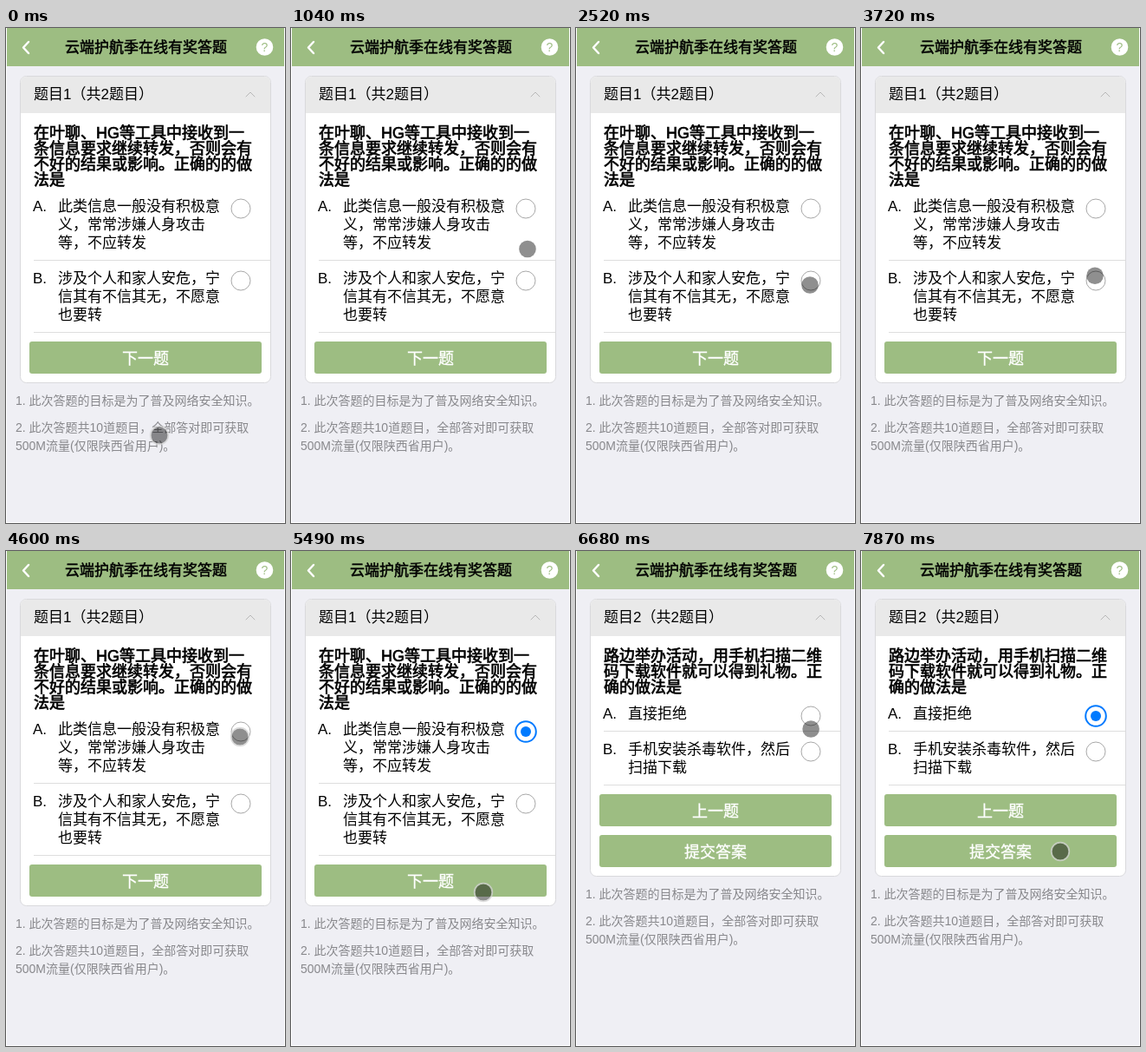
Animation, 322 px wide and 570 px high, one loop 8000 ms. Source, as an HTML page:

```html
<!DOCTYPE html>
<html lang="zh-CN">
<head>
<meta charset="utf-8">
<style>
  html, body { margin: 0; width: 100%; height: 100%; overflow: hidden; background: #fff; }
  svg { display: block; width: 322px; height: 570px;
        font: 17px "Liberation Sans", "Noto Sans CJK SC", "Noto Sans CJK", sans-serif; }
  .title { stroke: #000; stroke-width: .5px; }
  .question { font-size: 18px; stroke: #000; stroke-width: .7px; }
  .button { font-size: 18px; fill: #fff; stroke: #fff; stroke-width: .3px; text-anchor: middle; }
  .note { font-size: 14px; fill: #88888c; }
  .line { fill: none; stroke-linecap: round; stroke-linejoin: round; }
</style>
</head>
<body>
<svg id="stage" viewBox="0 0 322 570"></svg>
<script>
const LOOP = 8000, TICK = LOOP / 54;
const GREEN = '#9dbd82', BLUE = '#007aff';
const stage = document.getElementById('stage');

const text = (x, y, str, cls = '') => `<text x="${x}" y="${y}" class="${cls}">${str}</text>`;
const rect = (x, y, w, h, fill, extra = '') =>
  `<rect x="${x}" y="${y}" width="${w}" height="${h}" fill="${fill}" ${extra}/>`;
const circle = (x, y, r, attrs) => `<circle cx="${x}" cy="${y}" r="${r}" ${attrs}/>`;

const emptyRadio = y => circle(271, y, 11, 'fill="#fff" stroke="#a8a8a8"');
const checkedRadio = y =>
  circle(271, y, 11.8, `fill="#fff" stroke="${BLUE}" stroke-width="2"`) +
  circle(271, y, 6, `fill="${BLUE}"`);

function buildPage(number, question, options, buttons) {
  let y = 127, body = '', checked = '';
  for (const row of question) {
    body += text(32, y, row, 'question');
    y += 18;
  }
  y += 12;
  options.forEach((rows, i) => {
    body += text(31, y, 'AB'[i] + '.');
    rows.forEach((row, k) => body += text(60, y + 21 * k, row));
    body += emptyRadio(y - 3);
    if (i === 0) checked = checkedRadio(y - 3);
    y += 21 * rows.length;
    body += rect(32, y - 7, 273, 1, '#dedede');
    y += 20;
  });
  y -= 16;
  for (const label of buttons) {
    body += rect(27, y, 268, 37, GREEN, 'rx="3"') + text(161, y + 25.5, label, 'button');
    y += 47;
  }
  const card = rect(16.5, 55.5, 289, y - 55, '#fff', 'rx="7" stroke="#d9d9dc"') +
    '<path d="M17 98V63q0-7 7-7H298q7 0 7 7V98z" fill="#e9e9e9"/>' +
    text(32, 82, `题目${number}（共2题目）`) +
    '<path class="line" d="M277 79l5-5 5 5" stroke="#b8b8b8"/>';
  const notes = text(11, y + 26, '1. 此次答题的目标是为了普及网络安全知识。', 'note') +
    text(11, y + 57, '2. 此次答题共10道题目，全部答对即可获取', 'note') +
    text(11, y + 78, '500M流量(仅限陕西省用户)。', 'note');
  return `<g class="page">${card}${body}${notes}<g class="checked">${checked}</g></g>`;
}

stage.innerHTML =
  rect(1, 0, 320, 569, '#efeff4') + rect(1, 0, 320, 44, GREEN) +
  '<path class="line" d="M26 16l-6 6.5 6 6.5" stroke="#fff" stroke-width="2.5"/>' +
  text(68, 28, '云端护航季在线有奖答题', 'title') +
  circle(298.5, 22, 9.8, 'fill="#fff"') +
  `<text x="298.5" y="27" font-size="14" text-anchor="middle" fill="${GREEN}">?</text>` +
  buildPage(1,
    ['在叶聊、HG等工具中接收到一', '条信息要求继续转发，否则会有', '不好的结果或影响。正确的的做', '法是'],
    [['此类信息一般没有积极意', '义，常常涉嫌人身攻击', '等，不应转发'],
     ['涉及个人和家人安危，宁', '信其有不信其无，不愿意', '也要转']],
    ['下一题']) +
  buildPage(2,
    ['路边举办活动，用手机扫描二维', '码下载软件就可以得到礼物。正', '确的做法是'],
    [['直接拒绝'], ['手机安装杀毒软件，然后', '扫描下载']],
    ['上一题', '提交答案']) +
  circle(0, 0, 9.8, 'id="cursor" fill="#000" fill-opacity=".44"') +
  circle(0, 0, 10.3, 'id="ring" fill="none" stroke="#d2d2d2" stroke-opacity=".75" stroke-width="1.8"');

const pages = stage.querySelectorAll('.page');
const marks = stage.querySelectorAll('.checked');
const cursor = document.getElementById('cursor');
const ring = document.getElementById('ring');

// Pointer moves between ticks; after a tap move the pointer stays pressed until it leaves.
const moves = [
  { from: 0, to: 1, x: 177, y: 469, tap: true },
  { from: 1, to: 5, x: 274, y: 234 },
  { from: 6, to: 9, x: 270, y: 313 },
  { from: 9, to: 12, x: 266, y: 233 },
  { from: 12, to: 14, x: 270, y: 296 },
  { from: 24, to: 29, x: 270, y: 193 },
  { from: 30, to: 31, x: 270, y: 214, tap: true },
  { from: 32, to: 37, x: 222, y: 393, tap: true },
  { from: 39, to: 46, x: 274, y: 194, tap: true },
  { from: 48, to: 53, x: 230, y: 346, tap: true }
];
const FIRST_CHECK = 33, NEXT_PAGE = 39, SECOND_CHECK = 49;

const smooth = p => p * p * (3 - 2 * p);

function pointerAt(tick) {
  let { x, y, tap: pressed } = moves[0];
  for (const move of moves.slice(1)) {
    if (tick <= move.from) break;
    const p = Math.min(1, (tick - move.from) / (move.to - move.from));
    x += (move.x - x) * smooth(p);
    y += (move.y - y) * smooth(p);
    pressed = p === 1 && move.tap;
  }
  return { x, y, pressed };
}

const show = (el, on) => el.setAttribute('visibility', on ? 'visible' : 'hidden');

function render(time) {
  const tick = Math.floor(time % LOOP / TICK + 0.05);
  const second = tick >= NEXT_PAGE;
  show(pages[0], !second);
  show(pages[1], second);
  show(marks[0], !second && tick >= FIRST_CHECK);
  show(marks[1], tick >= SECOND_CHECK);

  const { x, y, pressed } = pointerAt(tick);
  for (const el of [cursor, ring]) el.setAttribute('transform', `translate(${x} ${y})`);
  show(ring, pressed);
}

const start = performance.now();
(function loop() {
  render(performance.now() - start);
  requestAnimationFrame(loop);
})();
</script>
</body>
</html>
```
